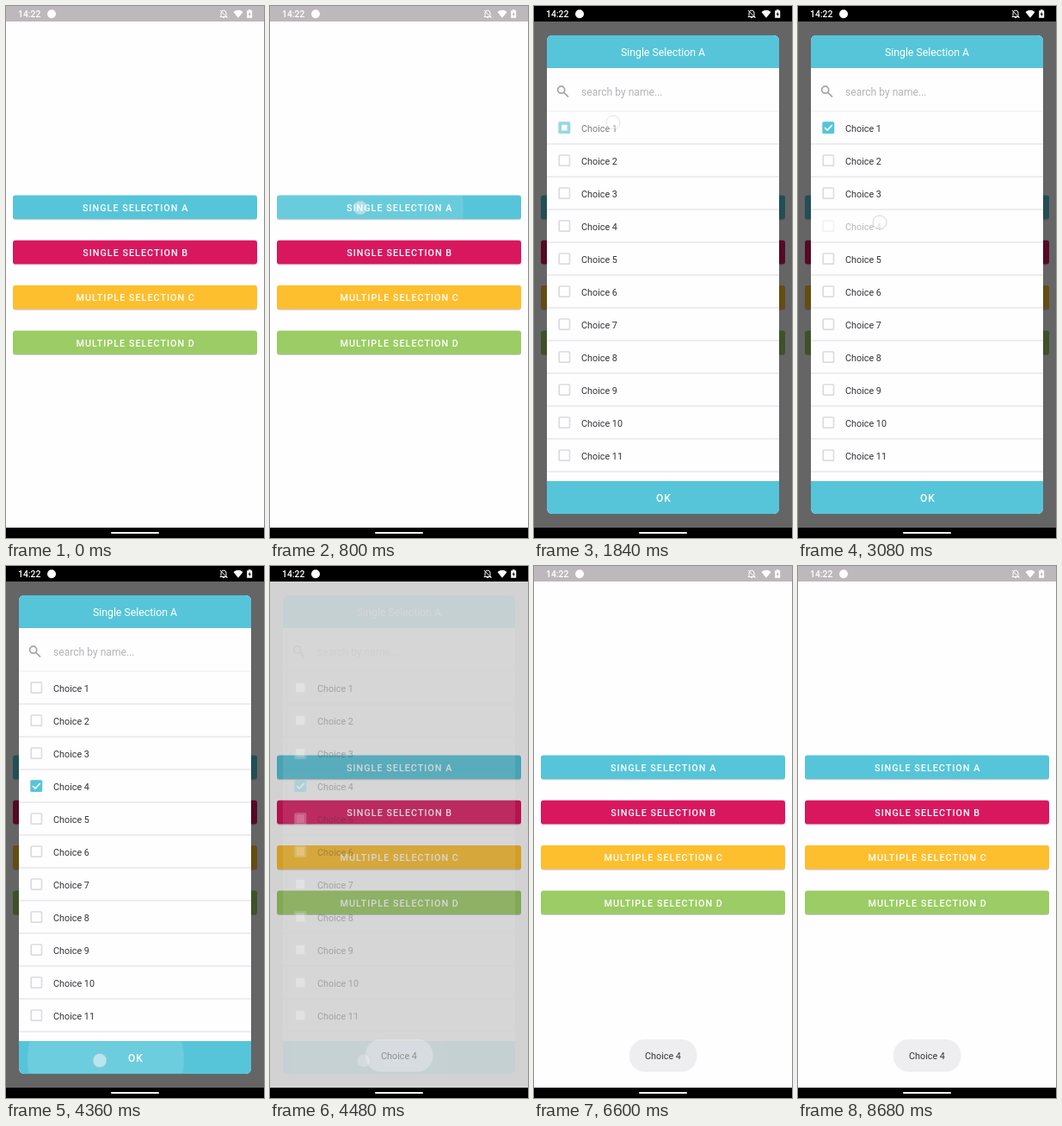
An HTML page for the animation above (8720 ms loop, 300 by 617 pixels).

```html
<!DOCTYPE html>
<html lang="en">
<head>
<meta charset="utf-8">
<title>Selection dialog</title>
<style>
  html, body { margin: 0; width: 100%; height: 100%; overflow: hidden; background: #fefdff; }
  svg { display: block; width: 100vw; height: 100vh; font-family: Roboto, sans-serif; }
  .mid { text-anchor: middle; }
  .button { font-size: 10.8px; font-weight: 500; letter-spacing: 1px; fill: #fff; }
  .label { font-size: 10.8px; fill: #333; }
</style>
</head>
<body>
<svg viewBox="0 0 300 617" preserveAspectRatio="none">
  <defs>
    <clipPath id="card"><rect x="15" y="34" width="270" height="555" rx="6"/></clipPath>
    <clipPath id="footer"><rect x="15" y="551.5" width="270" height="36.5"/></clipPath>
    <clipPath id="first"><rect x="8" y="219.5" width="284" height="27.5" rx="3"/></clipPath>
  </defs>
  <rect width="300" height="617" fill="#fefdff"/>
  <g id="buttons"></g>
  <circle id="buttonRipple" cx="105" cy="234" fill="#fff" clip-path="url(#first)"/>
  <rect id="dim" y="18" width="300" height="587"/>

  <g id="dialog" clip-path="url(#card)">
    <g id="panel">
      <rect x="15" y="34" width="270" height="555" fill="#fefdff"/>
      <rect x="15" y="34" width="270" height="38" fill="#56c5d9"/>
      <text class="mid" x="150" y="57.7" font-size="12.3" fill="#fff">Single Selection A</text>
      <g fill="none" stroke="#a2a2a4" stroke-width="1.7">
        <circle cx="31.7" cy="97.2" r="4"/><path d="M34.8 100.3L40 105.5"/>
      </g>
      <text x="55" y="104" font-size="12.1" fill="#b4b3b7">search by name...</text>
      <g id="lines"></g>
      <rect x="15" y="551" width="270" height="38" fill="#56c5d9"/>
      <circle id="okRipple" cx="116" cy="573" fill="#fff" clip-path="url(#footer)"/>
      <text class="mid" x="151" y="575.2" font-size="12" font-weight="500" letter-spacing="1" fill="#fff">OK</text>
    </g>
    <g id="rows"></g>
  </g>

  <g id="toast">
    <rect x="111" y="549" width="78.500" height="37.500" rx="18" fill="#eeedef"/>
    <text class="mid label" x="150" y="572">Choice 4</text>
  </g>
  <circle id="dot" r="8" fill="#fff" fill-opacity=".5" stroke="#bbb" stroke-opacity=".6"/>

  <rect id="status" width="300" height="18"/>
  <g fill="#fff">
    <text x="14" y="13.200" font-size="10.4" font-weight="500">14:22</text>
    <circle cx="53" cy="9.300" r="5"/>
    <path d="M264.500 7Q270 2.500 275.500 7L270 13.700Z"/>
    <path d="M282 4h2.500v1.200h1.700v8.600h-6V5.200H282Z"/>
    <path d="M250 11.500V8Q250 5.500 253 5Q256 5.500 256 8V11.500L257 12.500H249ZM252 13.300h2Q253 14.500 252 13.300"
          fill="none" stroke="#fff"/>
    <path d="M249 5L257.500 14" stroke="#fff"/>
  </g>
  <path id="bolt" d="M283.700 6.500L281.700 10H283V12.500L284.800 9H283.700Z"/>
  <rect y="605" width="300" height="12"/>
  <rect x="122" y="610" width="56" height="2" rx="1" fill="#fff"/>
</svg>
<script>
const LOOP = 8720, OPEN = 840, CLOSE = 4400, STATUS_BACK = 4520;
const $ = id => document.getElementById(id);
const ramp = (t, from, to) => Math.min(1, Math.max(0, (t - from) / (to - from)));
const set = (el, attrs) => { for (const k in attrs) el.setAttribute(k, attrs[k]); };

function add(parent, tag, attrs, text = '') {
  const el = document.createElementNS('http://www.w3.org/2000/svg', tag);
  set(el, attrs);
  el.textContent = text;
  return parent.appendChild(el);
}

const buttons = [
  ['SINGLE SELECTION A', '#56c5d9'], ['SINGLE SELECTION B', '#d9175e'],
  ['MULTIPLE SELECTION C', '#fdbf2d'], ['MULTIPLE SELECTION D', '#9ccc65']
];
buttons.forEach(([name, fill], i) => {
  const y = 219.5 + i * 52.3, box = { x: 8, width: 284, height: 27.5, rx: 3 };
  add($('buttons'), 'rect', { ...box, y: y + 1.2, opacity: .2 });
  add($('buttons'), 'rect', { ...box, y, fill });
  add($('buttons'), 'text', { class: 'mid button', x: 150.7, y: y + 18.2 }, name);
});

const rows = Array.from({ length: 11 }, (_, i) => {
  const y = 141 + i * 38, g = add($('rows'), 'g', {});
  add(g, 'rect', { x: 29.2, y: y - 6, width: 12.2, height: 12.2, rx: 1, fill: 'none', stroke: '#dcdbdf', 'stroke-width': 1.7 });
  const fill = add(g, 'rect', { x: 28.4, y: y - 6.8, width: 13.8, height: 13.8, rx: 1.5, fill: '#56c5d9' });
  const hole = add(g, 'rect', { fill: '#fefdff' });
  const tick = add(g, 'path', { d: `M31 ${y}l3 3l5.800 -6`, fill: 'none', stroke: '#fff', 'stroke-width': 1.6, pathLength: 1 });
  add(g, 'text', { class: 'label', x: 55, y: y + 4.5 }, `Choice ${i + 1}`);
  return { g, y, fill, hole, tick };
});
for (let i = 0; i < 12; i++)
  add($('lines'), 'rect', { x: 15, y: 121.5 + i * 38, width: 270, height: 1, fill: i ? '#dddce0' : '#eeedf0' });

// Each tap: press and release time, place, and the row it hits.
const taps = [
  { down: 640, up: 780, x: 105, y: 234 },
  { down: 1660, up: 1790, x: 92, y: 135, row: 0 },
  { down: 2980, up: 3110, x: 95, y: 251, row: 3 },
  { down: 4270, up: 4400, x: 109, y: 573.5 }
];
const picks = { 0: [1800, 3120], 3: [3120, LOOP] };

function drawRow({ g, y, fill, hole, tick }, i, t, settle, alpha) {
  const tap = taps.find(p => p.row === i);
  const pressed = tap ? .65 * ramp(t, tap.down, tap.down + 100) * (1 - ramp(t, tap.up, tap.up + 120)) : 0;
  set(g, {
    transform: `translate(${-(1 + i) * settle} ${-(1 + 2 * i) * settle})`,
    opacity: Math.max(0, 1 - .33 * i * settle) * (1 - pressed) * alpha
  });
  const [on, off] = picks[i] || [LOOP, LOOP];
  const k = t < off ? ramp(t, on, on + 120) : 1 - ramp(t, off, off + 120);
  const size = 10 * (1 - k);
  const drawn = t < off ? ramp(t, on + 110, on + 220) : 0;
  set(fill, { opacity: k > 0 ? 1 : 0 });
  set(hole, { x: 35.3 - size / 2, y: y + .1 - size / 2, width: size, height: size });
  set(tick, { 'stroke-dasharray': `${drawn} 2`, opacity: drawn > 0 ? 1 : 0 });
}

function ripple(el, tap, t, reach) {
  set(el, {
    r: reach * ramp(t, tap.down, tap.down + 90),
    opacity: .13 * (1 - ramp(t, tap.up, tap.up + 150))
  });
}

function draw(t) {
  const alpha = ramp(t, OPEN, OPEN + 90) * (1 - ramp(t, CLOSE, CLOSE + 90));
  const settle = 1 - ramp(t, OPEN + 80, OPEN + 180);
  const dark = t >= OPEN && t < STATUS_BACK;
  set($('dim'), { opacity: .6 * ramp(t, OPEN, OPEN + 107) * (1 - ramp(t, CLOSE, CLOSE + 114)) });
  set($('panel'), { opacity: alpha });
  set($('lines'), { opacity: 1 - settle });
  rows.forEach((row, i) => drawRow(row, i, t, settle, Math.sqrt(alpha)));
  set($('toast'), { opacity: ramp(t, 4440, 4540) });
  set($('status'), { fill: dark ? '#000' : '#bdb8bb' });
  set($('bolt'), { fill: dark ? '#000' : '#bdb8bb' });

  ripple($('buttonRipple'), taps[0], t, 120);
  ripple($('okRipple'), taps[3], t, 91);
  const tap = taps.find(p => t >= p.down && t < p.up + 150);
  set($('dot'), tap
    ? { cx: tap.x, cy: tap.y, opacity: ramp(t, tap.down, tap.down + 60) * (1 - ramp(t, tap.up, tap.up + 150)) }
    : { opacity: 0 });
}

const start = performance.now();
function tick() {
  draw(Math.max(0, performance.now() - start) % LOOP);
  requestAnimationFrame(tick);
}
draw(0);
requestAnimationFrame(tick);
</script>
</body>
</html>
```
